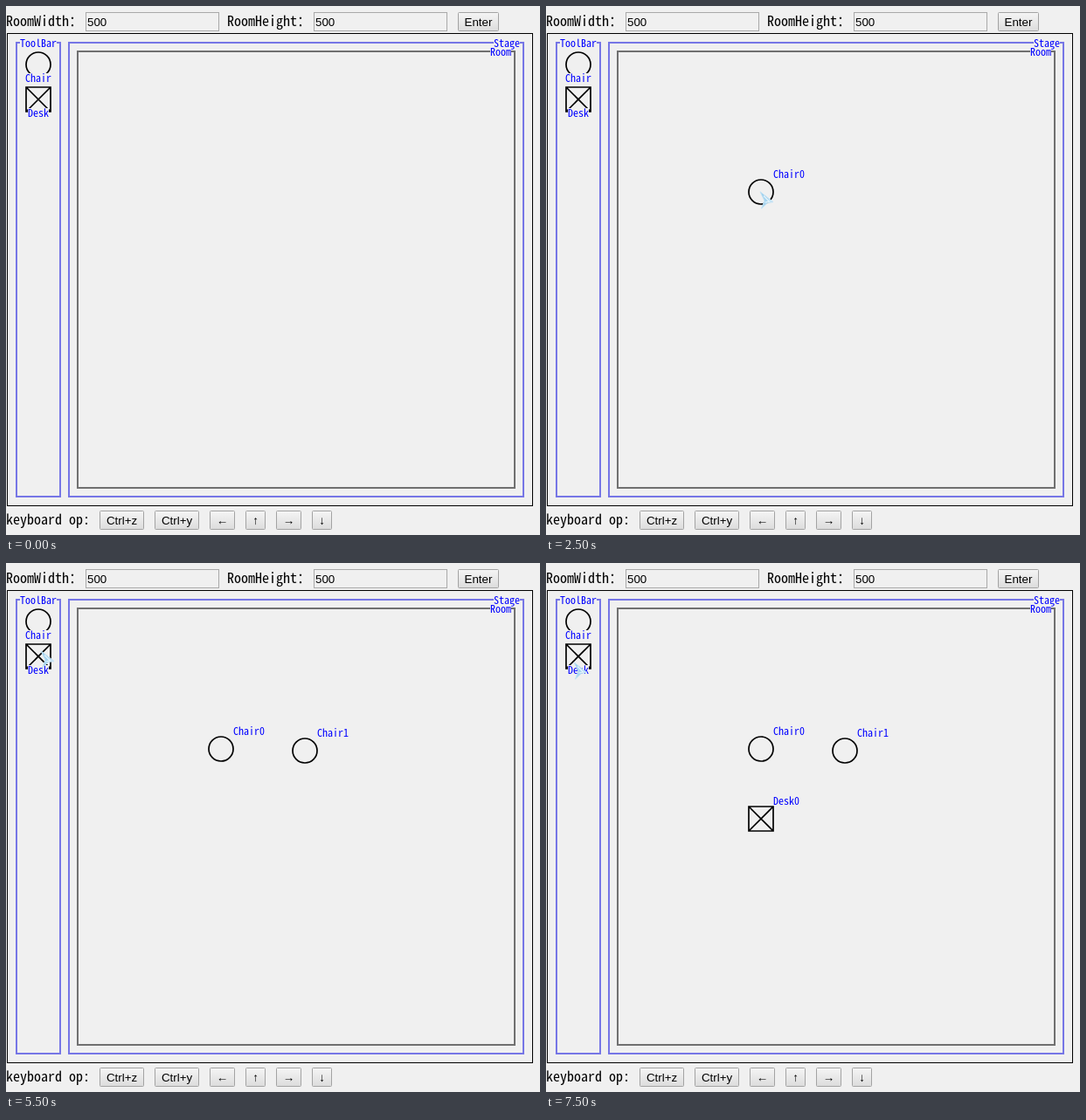
Write an HTML page that moves like this. It is 611 px wide and 606 px high and loops after 8 s.

```html
<!DOCTYPE html>
<html lang="zh-CN">
<head>
<meta charset="utf-8">
<title>Room planner</title>
<style>
  html, body { margin: 0; width: 100%; height: 100%; overflow: hidden; background: #f0f0f0; }
  svg { display: block; width: 611px; height: 606px; }
  text { white-space: pre; }
  .label, .tag {
    font-family: "Noto Sans Mono CJK SC", "Noto Sans Mono CJK JP", "Liberation Mono", monospace;
    font-size-adjust: ch-width 0.5;
  }
  .label { font-size: 16px; }
  .tag { font-size: 12px; fill: #00f; }
  .ui { font: 13.333px "Liberation Sans", Arial, sans-serif; }
  .mid { text-anchor: middle; }
  .ink { fill: none; stroke: #000; stroke-width: 1.7; }
</style>
</head>
<body>
<svg id="stage" viewBox="0 0 611 606">
  <defs>
    <linearGradient id="face" x2="0" y2="1">
      <stop stop-color="#f5f5f5"/><stop offset="1" stop-color="#dcdcdc"/>
    </linearGradient>
    <linearGradient id="ice" x2="1" y2="0.6">
      <stop stop-color="#8cc8ec"/><stop offset="0.6" stop-color="#a9d6f0"/><stop offset="1" stop-color="#d6ecf8"/>
    </linearGradient>
  </defs>
</svg>
<script>
const svg = document.getElementById("stage");

function add(name, attrs, parent = svg, text = "") {
  const el = document.createElementNS("http://www.w3.org/2000/svg", name);
  for (const key in attrs) el.setAttribute(key, attrs[key]);
  el.textContent = text;
  return parent.appendChild(el);
}
const write = (cls, x, y, text, parent) => add("text", { class: cls, x, y }, parent, text);
const box = (x, y, width, height, stroke, lineWidth, fill = "none", rx = 0) =>
  add("rect", { x, y, width, height, stroke, "stroke-width": lineWidth, fill, rx });
const wipe = (x, y, width, height) => add("rect", { x, y, width, height, fill: "#f0f0f0" });

function field(x, value) {
  box(x + .5, 7.5, 152, 21, "#a9a9a9", 1);
  write("ui", x + 2, 23, value);
}
function button(x, y, width, text) {
  box(x + .5, y + .5, width - 1, 21, "#a3a3a3", 1, "url(#face)", 1);
  write("ui mid", x + width / 2, y + 16, text);
}
const chair = (x, y, parent) => add("circle", { class: "ink", cx: x, cy: y, r: 14 }, parent);
const desk = (x, y, parent) => add("path", {
  class: "ink",
  d: `M${x - 14} ${y - 14}h28v28h-28zl28 28m0-28l-28 28`
}, parent);

// Form rows
write("label", 0, 23, "RoomWidth：");
field(91, "500");
write("label", 253, 23, "RoomHeight：");
field(352, "500");
button(517, 7, 47, "Enter");
write("label", 0, 594, "keyboard op:");
[[107, 51, "Ctrl+z"], [170, 51, "Ctrl+y"], [233, 29, "←"], [274, 23, "↑"], [309, 29, "→"], [350, 23, "↓"]]
  .forEach(([x, width, text]) => button(x, 578, width, text));

// Panels
box(1.5, 31.5, 601, 541, "#000", 1);
box(12, 42, 50, 520, "#7676e6", 2);
box(72, 42, 520, 520, "#7676e6", 2);
box(82, 52, 500, 500, "#707070", 2);
chair(37, 67);
desk(37, 107);
[[16, 47, "ToolBar"], [558, 47, "Stage"], [554, 57, "Room"], [22, 87, "Chair"], [25, 127, "Desk"]]
  .forEach(([x, y, text]) => {
    wipe(x, y - 10, text.length * 6, 12);
    write("tag", x, y, text);
  });

// Movable parts
function piece(draw, name) {
  const group = add("g", {});
  draw(0, 0, group);
  write("tag", 14, -16, name, group);
  return group;
}
const pieces = [piece(chair, "Chair0"), piece(chair, "Chair1"), piece(desk, "Desk0")];

const pointer = add("g", {});
const poses = ["M1 .8L16 12.5L9.5 13.5L2.5 20L6 11z", "M1 .8L15.5 13L7.5 15L2.5 20z"].map(d =>
  add("path", { d, fill: "url(#ice)", stroke: "#c3e2f4", "stroke-width": 1, "stroke-linejoin": "round" }, pointer));
add("path", { d: "M5 5.5L11.5 12L6.5 13", fill: "none", stroke: "#e6f5fc", "stroke-width": 1.2 }, pointer);

// Each step: pointer [x, y, pose], then the places of Chair0, Chair1, Desk0
const STEP = 500;
const a = [246, 213], b = [342, 215], c = [246, 293];
const steps = [
  [],
  [[160, 137, 0]],
  [[34, 64, 0]],
  [[139, 126, 1], [126, 115]],
  [[234, 211, 0], [234, 209]],
  [[244, 212, 0], a],
  [[32, 69, 0], a],
  [[258, 172, 1], a, [244, 164]],
  [[336, 211, 1], a, [338, 211]],
  [[340, 214, 1], a, b],
  [[119, 142, 0], a, b],
  [[39, 100, 0], a, b],
  [[207, 251, 1], a, b, [203, 246]],
  [[240, 287, 1], a, b, [243, 288]],
  [[245, 292, 1], a, b, c],
  [[31, 113, 0], a, b, c]
];

function place(el, spot) {
  el.setAttribute("visibility", spot ? "visible" : "hidden");
  if (spot) el.setAttribute("transform", `translate(${spot[0]} ${spot[1]})`);
}

const start = performance.now();
function render(now) {
  const time = Math.max(0, now - start);
  const [tip, ...spots] = steps[Math.floor(time / STEP) % steps.length];
  place(pointer, tip);
  poses.forEach((pose, i) => pose.setAttribute("display", tip && tip[2] === i ? "inline" : "none"));
  pieces.forEach((el, i) => place(el, spots[i]));
  requestAnimationFrame(render);
}
render(start);
</script>
</body>
</html>
```
